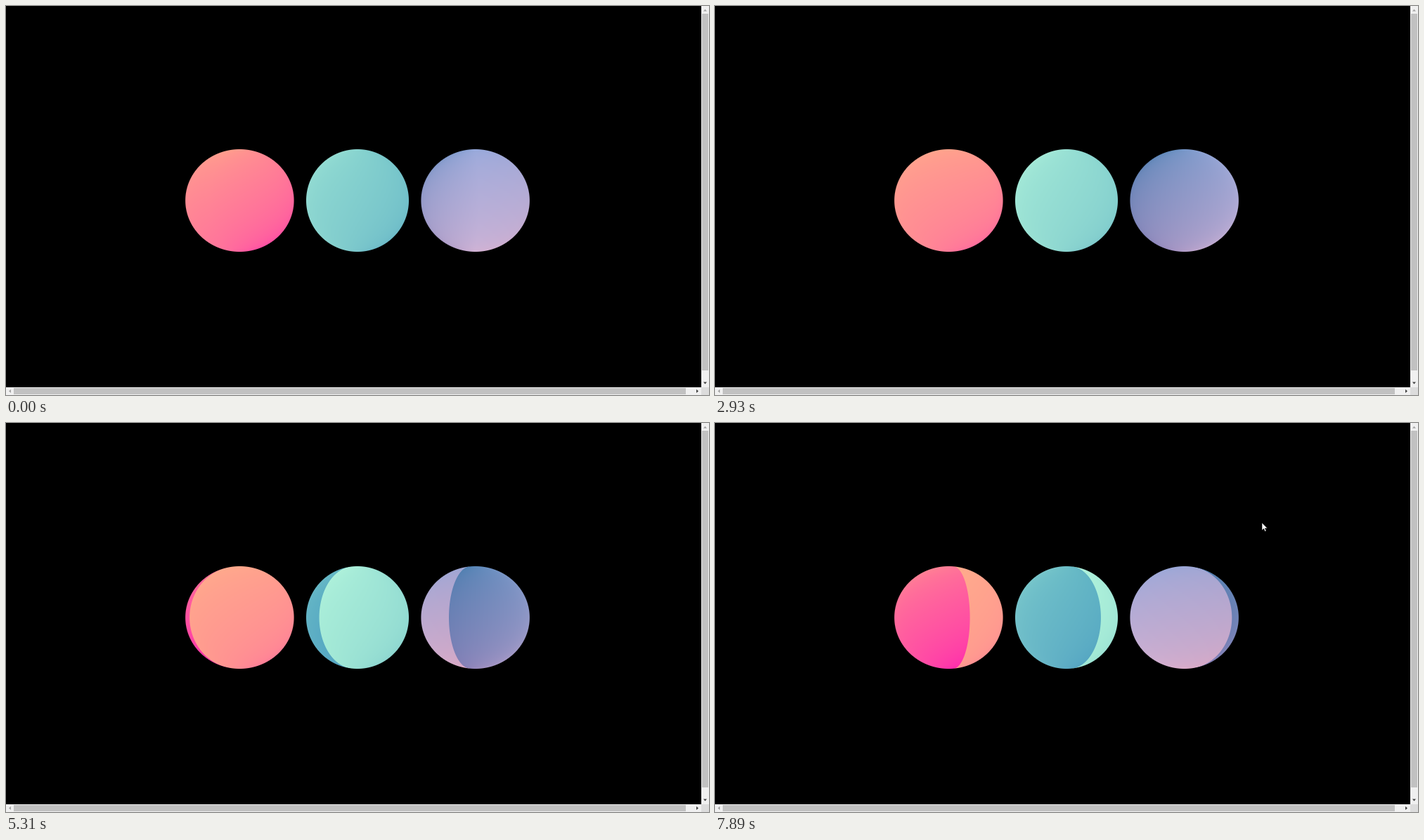
Animation, 1000 px wide and 554 px high, one loop 7990 ms. Source, as an HTML page with a canvas:

```html
<!DOCTYPE html>
<html lang="en">
<head>
<meta charset="utf-8">
<title>Three turning spheres</title>
<style>
  html, body { margin: 0; width: 100%; height: 100%; overflow: hidden; background: #000; }
  canvas { position: absolute; left: 250px; top: 200px; }
  svg { position: absolute; left: 0; top: 0; }
  #cursor { animation: appear 7990ms step-end infinite; }
  @keyframes appear { 0% { visibility: hidden; } 79.23% { visibility: visible; } }
</style>
</head>
<body>
<canvas id="view" width="500" height="154"></canvas>
<svg width="1000" height="554" viewBox="0 0 1000 554">
  <path fill="#f0f0f0" d="M989 0h11v554H0V543h989z"/>
  <path fill="#dcdcdc" d="M989 543h11v11h-11z"/>
  <path fill="#c1c1c1" d="M990 11h9v508h-9zM11 544h956v9H11z"/>
  <path fill="#a3a3a3" d="M992 7.5h5l-2.5-3zM7 546v5l-3-2.5z"/>
  <path fill="#404040" d="M992 535.5h5l-2.5 3zM982 546v5l3-2.5z"/>
  <path id="cursor" fill="#fff" stroke="#000" stroke-width=".6"
        d="M778 142v11l2.6-2.4 1.7 3.8 1.8-.8-1.7-3.7h3.4z"/>
</svg>
<script>
const LOOP = 7990, TAU = 2 * Math.PI;
const FOCAL = 480, DEPTH = 6.65, GAP = 2.27;   // camera, in sphere radii

// Seam longitude in degrees over time
const turn = [
  [0, -193], [1370, -193], [1660, -160], [2020, -139], [2930, -111],
  [4500, -64], [6000, -18.7], [6810, 3.4], [7890, 36.6], [7990, 36.6]
];

// Runs of redraws: start, end, count
const runs = [
  [1370, 1660, 10], [1810, 2530, 15], [2610, 3330, 8], [3410, 4200, 9], [4280, 5030, 8],
  [5130, 5900, 9], [6000, 6180, 3], [6330, 7090, 9], [7170, 7470, 4], [7620, 7890, 4]
];

const rgb = hex => [0, 2, 4].map(i => parseInt(hex.slice(i, i + 2), 16));
const skin = (top, bottom) => [top, bottom].map(row => row.split(' ').map(rgb));

// Colours at the start, middle and end of the wrapped gradient, top and bottom
const balls = [
  { x: -GAP, skin: skin('ffae8b ffa58a ff8094', 'ff9690 ff65a0 ff20b0') },
  { x: 0, skin: skin('b2f4dc 8ed9d1 66bac5', '9ee5d4 7ac6cb 51a1c2') },
  { x: GAP, skin: skin('4680b0 90a8dc 95a5d6', '9080b8 d8b4d4 e4aac4') }
];

const canvas = document.getElementById('view');
const ctx = canvas.getContext('2d');
const image = ctx.createImageData(canvas.width, canvas.height);
const clamp = v => Math.max(0, Math.min(1, v));
const mix = (a, b, k) => a + (b - a) * k;

// Longitude and polar angle where the ray through a screen point meets a ball
function hit(px, py, x) {
  const dx = px / FOCAL, dy = py / FOCAL;
  const a = dx * dx + dy * dy + 1;
  const b = -dx * x - DEPTH;
  const c = x * x + DEPTH * DEPTH - 1;
  const s = (-b - Math.sqrt(Math.max(0, b * b - a * c))) / a;
  return [
    Math.atan2(s * dx - x, DEPTH - s) / TAU,
    Math.acos(Math.max(-1, Math.min(1, -s * dy))) / Math.PI
  ];
}

// Everything about a pixel that does not depend on time
function mapPixels(ball) {
  const h = DEPTH * DEPTH - 1, x = ball.x;
  const mid = FOCAL * x * DEPTH / h;
  const rx = FOCAL * Math.sqrt(x * x + h) / h;
  const ry = FOCAL / Math.sqrt(h);
  const list = [];
  for (let j = 0; j < canvas.height; j++) {
    for (let i = 0; i < canvas.width; i++) {
      const px = i + 250.5 - 500, py = j + 200.5 - 277;
      const cover = clamp((1 - Math.hypot((px - mid) / rx, py / ry)) * ry + 0.5);
      if (!cover) continue;
      const [lon, w] = hit(px, py, x);
      const span = Math.abs(hit(px + 0.5, py, x)[0] - hit(px - 0.5, py, x)[0]);
      list.push({ at: 4 * (j * canvas.width + i), cover, lon, w, span: Math.min(0.03, span + 1e-5) });
    }
  }
  return list;
}

function shade(skin, u, w, ch) {
  const n = u < 0.5 ? 0 : 1, k = u * 2 - n;
  const row = r => mix(r[n][ch], r[n + 1][ch], k);
  return mix(row(skin[0]), row(skin[1]), w);
}

function draw(seam) {
  const data = image.data;
  for (const ball of balls) {
    for (const p of ball.pixels) {
      const raw = p.lon - seam, u = raw - Math.floor(raw);
      const edge = (raw - Math.round(raw)) / p.span + 0.5;
      const onSeam = edge > 0 && edge < 1;
      for (let ch = 0; ch < 3; ch++) {
        const v = onSeam
          ? mix(shade(ball.skin, 1, p.w, ch), shade(ball.skin, 0, p.w, ch), edge)
          : shade(ball.skin, u, p.w, ch);
        data[p.at + ch] = v * p.cover;
      }
    }
  }
  ctx.putImageData(image, 0, 0);
}

function lastChange(t) {
  let last = 0;
  for (const [start, end, count] of runs) {
    if (t < start) break;
    const step = (end - start) / (count - 1);
    last = start + Math.min(count - 1, Math.floor((t - start) / step)) * step;
  }
  return last;
}

function seamAt(t) {
  const i = Math.max(1, turn.findIndex(k => k[0] > t));
  const [t0, a0] = turn[i - 1], [t1, a1] = turn[i];
  return mix(a0, a1, (t - t0) / (t1 - t0)) / 360;
}

for (const ball of balls) ball.pixels = mapPixels(ball);
for (let i = 3; i < image.data.length; i += 4) image.data[i] = 255;

const cursor = document.getElementById('cursor').getAnimations()[0];
const begin = performance.now();
if (cursor) cursor.currentTime = 0;
let shown = -1;

function frame() {
  const t = lastChange((performance.now() - begin) % LOOP);
  if (t !== shown) draw(seamAt(shown = t));
  requestAnimationFrame(frame);
}
frame();
</script>
</body>
</html>
```
